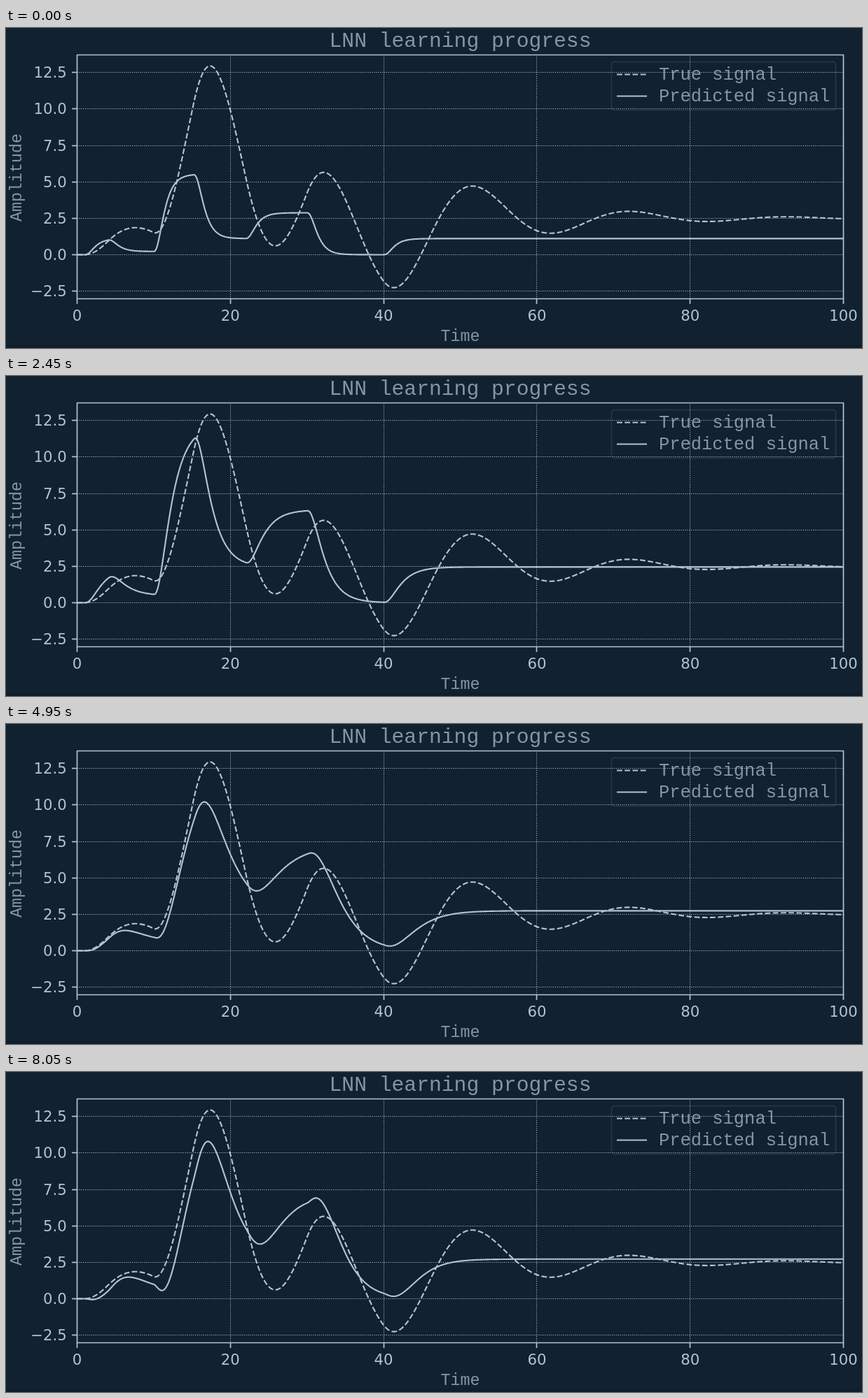
An HTML page with a canvas for the animation above (8.1 s loop, 1222 by 458 pixels).

```html
<!DOCTYPE html>
<html lang="en">
<head>
<meta charset="utf-8">
<title>LNN learning progress</title>
<style>
html, body { margin: 0; width: 100%; height: 100%; overflow: hidden; background: #112130; }
canvas { display: block; }
</style>
</head>
<body>
<canvas id="stage" width="1222" height="458"></canvas>
<script>
const ctx = document.getElementById('stage').getContext('2d');
const FG = '#b0c4d3', BG = '#112130';
const MONO = '"Courier New", "Liberation Mono", monospace';
const SANS = '"DejaVu Sans", sans-serif';
const PT = 2.12; // pixels per typographic point
const LEFT = 101.5, RIGHT = 1195.5, TOP = 38.5, BOTTOM = 387.5;
const px = t => LEFT + t * 10.94;
const py = v => 324.45 - v * 20.85;
const snap = c => Math.round(c - 0.5) + 0.5;

// Piecewise constant input: [start time, level]
const input = [[0, 0], [1, 1], [4, 0.2], [10, 5], [15.2, 1], [22, 2.6], [30, 0], [40, 1]];

// Learned system over time: gain, real pole, pair frequency, pair damping, lead time of the zero
const stages = [
  { at: 0,    p: [1.106, 1.1, 2.87, 1.01, 0] },
  { at: 650,  p: [1.587, 1.02, 2.69, 1.02, 0] },
  { at: 1500, p: [1.995, 1.02, 2.69, 1.02, 0] },
  { at: 2450, p: [2.45, 0.61, 2.17, 1.09, 0] },
  { at: 4100, p: [2.74, 0.42, 0.84, 1, 0], easeOut: true },
  { at: 5800, p: [2.74, 0.42, 0.8, 0.94, 0.25] },
  { at: 8050, p: [2.72, 0.42, 0.77, 0.84, 0.7] }
];

function paramsAt(ms) {
  const i = Math.max(1, stages.findIndex(s => s.at >= ms));
  const a = stages[i - 1], b = stages[i];
  let k = (ms - a.at) / (b.at - a.at);
  if (b.easeOut) k = 1 - (1 - k) ** 2;
  return a.p.map((v, j) => v + (b.p[j] - v) * k);
}

// Response of a first-order lag followed by a second-order system
function response([gain, pole, w, damping, zero]) {
  const dt = 0.01, lag = 1 - Math.exp(-pole * dt), path = new Path2D();
  let x = 0, y = 0, v = 0, part = 0;
  for (let n = 0; n <= 10000; n++) {
    if (n % 10 === 0) path.lineTo(px(n * dt), py(gain * (y - zero * v)));
    while (part + 1 < input.length && n >= Math.round(input[part + 1][0] / dt)) part++;
    x += (input[part][1] - x) * lag;
    v += dt * (w * w * (x - y) - 2 * damping * w * v);
    y += dt * v;
  }
  return path;
}

const trueSignal = response([2.5, 1e6, Math.sqrt(0.1), 0.075 / Math.sqrt(0.1), 0]);

function line(x1, y1, x2, y2, width, dash = []) {
  ctx.lineWidth = width;
  ctx.setLineDash(dash);
  ctx.beginPath();
  ctx.moveTo(x1, y1);
  ctx.lineTo(x2, y2);
  ctx.stroke();
}

function text(str, x, y, points, family, align = 'center') {
  ctx.font = `${points * PT}px ${family}`;
  ctx.textAlign = align;
  ctx.fillText(str, x, y);
}

const DASH = [3.7 * PT, 1.6 * PT], DOTS = [0.5 * PT, 0.825 * PT];

function draw(ms) {
  ctx.fillStyle = BG;
  ctx.fillRect(0, 0, 1222, 458);
  ctx.fillStyle = '#0f1c2b';
  ctx.fillRect(0, 454, 1222, 4);
  ctx.fillStyle = ctx.strokeStyle = FG;

  for (let t = 0; t <= 100; t += 20) {
    const x = snap(px(t));
    line(x, BOTTOM, x, TOP, 0.5 * PT, DOTS);
    line(x, BOTTOM, x, BOTTOM + 3.5 * PT, 0.8 * PT);
    text(t, px(t), 418.5, 10, SANS);
  }
  for (let v = -2.5; v <= 12.5; v += 2.5) {
    const y = snap(py(v));
    line(LEFT, y, RIGHT, y, 0.5 * PT, DOTS);
    line(LEFT - 3.5 * PT, y, LEFT, y, 0.8 * PT);
    text(v.toFixed(1).replace('-', '\u2212'), LEFT - 7 * PT, y + 7.7, 10, SANS, 'right');
  }

  ctx.lineJoin = 'round';
  ctx.lineWidth = PT;
  ctx.setLineDash(DASH);
  ctx.stroke(trueSignal);
  ctx.setLineDash([]);
  ctx.stroke(response(paramsAt(ms)));

  ctx.lineWidth = 0.8 * PT;
  ctx.strokeRect(LEFT, TOP, RIGHT - LEFT, BOTTOM - TOP);

  ctx.globalAlpha = 0.15;
  ctx.lineWidth = 1.5;
  ctx.beginPath();
  ctx.roundRect(864.5, 48.5, 320, 69, 4);
  ctx.stroke();
  ctx.globalAlpha = 1;
  line(872, 66.5, 915, 66.5, PT, DASH);
  line(872, 97.5, 915, 97.5, PT);

  // Softer ink for the light typewriter labels
  ctx.globalAlpha = 0.72;
  text('True signal', 932, 74, 12, MONO, 'left');
  text('Predicted signal', 932, 105, 12, MONO, 'left');
  text('LNN learning progress', 648.5, 26.5, 14, MONO);
  text('Time', 648.5, 447.5, 11, MONO);
  ctx.save();
  ctx.translate(22, 214);
  ctx.rotate(-Math.PI / 2);
  text('Amplitude', 0, 0, 11, MONO);
  ctx.restore();
  ctx.globalAlpha = 1;
}

let shown = -1;
function tick() {
  const step = Math.floor(performance.now() / 50) % 162;
  if (step !== shown) draw((shown = step) * 50);
  requestAnimationFrame(tick);
}
tick();
</script>
</body>
</html>
```
